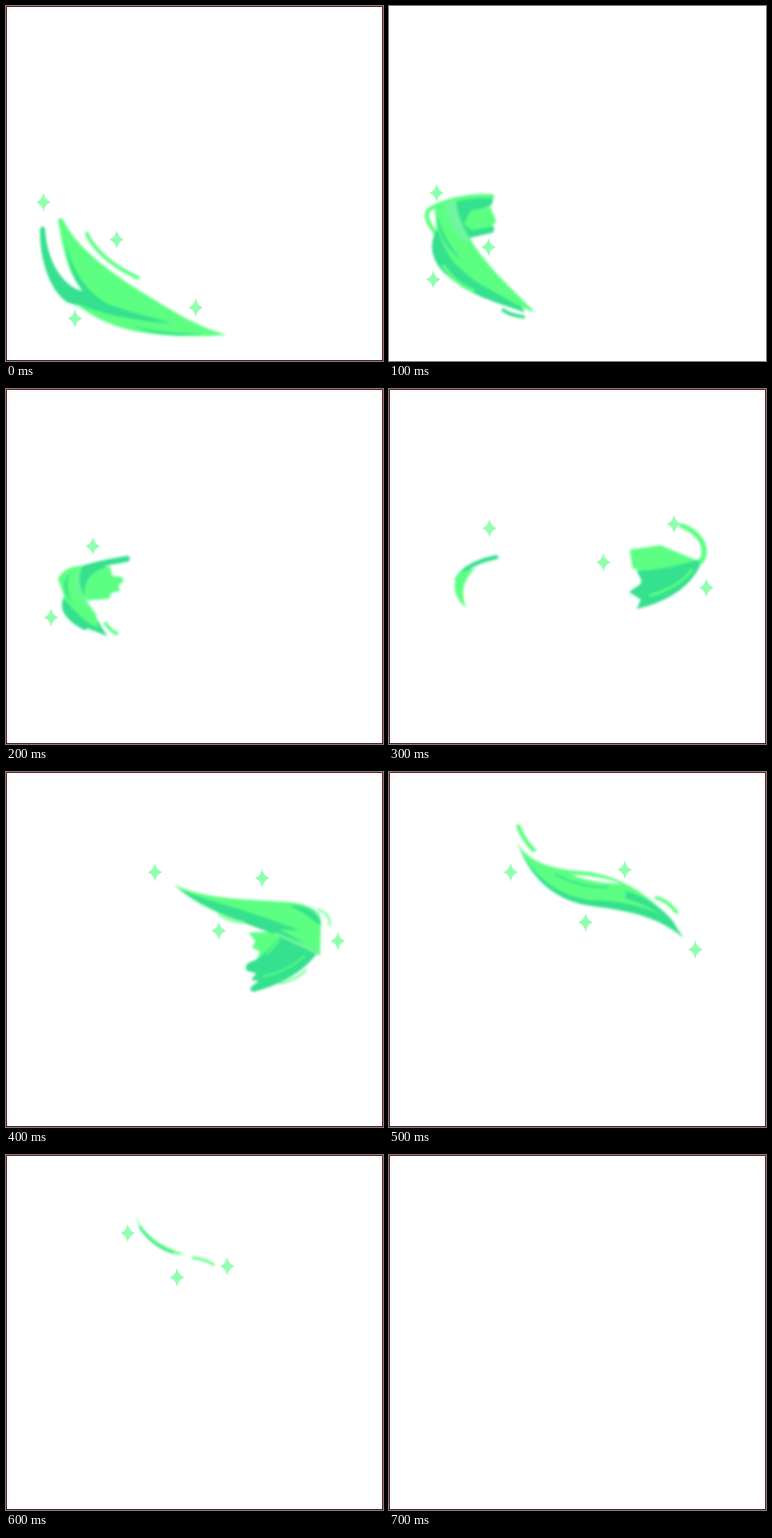
These frames come from a looping animation (443x418 px, 0.8 s). An HTML page:

```html
<!DOCTYPE html>
<html lang="en">
<head>
<meta charset="utf-8">
<title>Green swirl</title>
<style>
html, body { margin: 0; width: 100%; height: 100%; overflow: hidden; background: #fff; }
svg { display: block; width: 443px; height: 418px; }
</style>
</head>
<body>
<svg id="stage" viewBox="0 0 443 418">
  <defs>
    <filter id="soft" filterUnits="userSpaceOnUse" x="0" y="0" width="443" height="418" color-interpolation-filters="sRGB">
      <feGaussianBlur stdDeviation="1.6"/>
    </filter>
    <filter id="faint" filterUnits="userSpaceOnUse" x="0" y="0" width="443" height="418" color-interpolation-filters="sRGB">
      <feGaussianBlur stdDeviation="0.5"/>
    </filter>
  </defs>
</svg>
<script>
const NS = 'http://www.w3.org/2000/svg';
const STEP = 100, LOOP = 800;
const L = '#5cff82', T = '#35e08e', M = '#72f5a0', P = '#8effaa', W = '#fff';
const STAR = 'M0-11Q1.6-2.6 8.5 0Q1.6 2.6 0 11Q-1.6 2.6-8.5 0Q-1.6-2.6 0-11Z';
const stage = document.getElementById('stage');

// Each pose: strokes as [colour, path, line width]; no width means a filled shape.
const poses = [
  { stars: [[44, 231], [130, 275], [223, 355], [81, 368]], shapes: [
    [T, 'M40 262Q43 257 46 262C47 286 56 318 82 333L112 362L72 349C50 334 39 295 40 262Z'],
    [L, 'M61 252Q64 247 68 253C82 283 120 312 160 337C195 359 225 378 259 387C215 391 165 389 130 377C105 368 88 357 75 344L93 338C72 316 68 290 61 252Z'],
    [T, 'M70 276C77 310 92 334 118 350C142 360 170 366 196 374C155 371 112 364 72 346L60 325C72 330 82 333 90 336C78 320 72 300 70 276Z'],
    [T, 'M147 376C174 384 204 386 232 386C204 390 170 387 147 376Z'],
    [L, 'M95 268C103 288 128 308 155 320', 4.5]] },
  { bare: true, stars: [[56, 220], [117, 284], [52, 322]], shapes: [
    [T, 'M54 234C75 224 98 222 123 223L121 234L108 240L124 262L122 267L95 273L58 292Z'],
    [L, 'M96 241L119 236L126 254L120 260L98 264L88 257Z'],
    [L, 'M121 224C92 222 62 230 47 240C40 247 48 259 57 270', 5],
    [T, 'M55 265C46 283 51 302 68 317C95 342 130 350 160 361L146 338L98 286Z'],
    [L, 'M54 240C65 230 72 230 79 230C82 260 104 294 147 336L172 361C148 353 118 332 96 322C74 304 55 276 54 240Z'],
    [M, 'M66 231L79 229C79 246 86 262 97 276L88 277C75 264 68 248 66 231Z'],
    [T, 'M57 246C61 264 72 285 86 300C70 288 57 271 57 246Z'],
    [T, 'M62 288C75 306 100 327 125 341', 3],
    [L, 'M64 306C75 322 88 331 99 335', 4],
    [T, 'M134 358C141 363 150 365 158 366', 4]] },
  { stars: [[102, 185], [53, 269]], shapes: [
    [T, 'M142 200C116 205 94 208 75 218', 7],
    [L, 'M90 222C98 211 112 209 122 209L125 220L138 222L137 228L132 231L134 238L124 240L121 247L96 249L88 240Z'],
    [T, 'M84 216C95 208 107 208 119 209C101 215 93 222 92 242L80 237Z'],
    [T, 'M69 243C60 258 69 272 92 284L96 282L119 291L105 268L80 235Z'],
    [L, 'M61 224C65 214 76 208 91 208C82 221 87 242 106 265L108 281C92 275 80 260 69 248Q66 235 61 224Z'],
    [T, 'M76 216C69 228 72 240 78 252C67 240 65 226 76 216Z'],
    [M, 'M85 216C80 232 88 246 97 257', 3],
    [L, 'M117 276Q122 284 130 288', 4]] },
  { stars: [[118, 164], [335, 159], [252, 204], [373, 234]], shapes: [
    [T, 'M126 198C102 203 87 211 80 224', 5],
    [L, 'M82 216C73 230 77 247 91 258C84 241 86 227 101 211Z'],
    [L, 'M283 189L319 184L367 204L350 226L294 232L300 216L286 211Z'],
    [T, 'M291 214C318 214 344 207 369 199C360 229 331 250 291 259L296 248L282 239L298 228Z'],
    [L, 'M307 243C329 237 346 226 356 213', 3],
    [L, 'M367 203C377 185 363 168 344 161', 6]] },
  { stars: [[175, 118], [301, 125], [250, 187], [390, 199]], shapes: [
    [L, 'M285 189L324 188L354 208L324 222L296 220L298 211L289 207L293 199Z'],
    [T, 'M324 193L366 213C348 237 323 250 291 259Q284 257 289 252L297 246L288 245L294 237L283 234Q278 226 292 222L302 215Z'],
    [L, 'M300 207L314 194M307 214L321 199', 2],
    [L, 'M302 241C320 237 337 229 351 217', 2],
    [L, 'M197 132C228 149 280 150 330 153C357 155 373 164 370 181L369 216C340 202 306 187 274 175C240 164 215 150 197 132Z'],
    [T, 'M203 138C240 153 289 164 346 187L321 185L352 202C310 189 245 169 203 138Z'],
    [T, 'M332 157C352 157 369 164 370 181C358 173 348 163 332 157Z'],
    [M, 'M316 190C338 198 352 207 367 214', 3],
    [P, 'M367 162C377 166 382 173 380 180', 3],
    [P, 'M352 233C345 242 335 246 322 249', 3],
    [P, 'M251 168Q264 176 278 177', 4]] },
  { stars: [[143, 118], [277, 115], [231, 177], [360, 209]], shapes: [
    [L, 'M150 82C162 104 184 112 216 116C261 117 310 139 346 195C320 171 283 164 240 158C193 151 164 119 150 82Z'],
    [T, 'M155 94C172 123 197 145 236 151C276 151 309 160 333 176L346 195C315 170 282 163 240 158C196 153 169 126 155 94Z'],
    [T, 'M278 140C306 149 326 163 338 182C319 165 299 155 278 149Z'],
    [T, 'M196 121Q227 137 258 136', 2],
    [W, 'M214 121C235 121 257 125 273 132C252 131 232 128 214 121Z'],
    [L, 'M152 64Q158 80 170 92', 5],
    [L, 'M314 148Q327 151 338 165', 4]] },
  { stars: [[143, 92], [260, 131], [201, 144]], shapes: [
    [L, 'M151 70C160 91 180 108 211 117C188 119 162 103 151 70Z'],
    [T, 'M157 85Q171 107 196 115', 2],
    [L, 'M220 121Q234 123 244 129', 3]] },
  { stars: [], shapes: [] }
];

function add(parent, tag, attrs) {
  const el = document.createElementNS(NS, tag);
  for (const key in attrs) el.setAttribute(key, attrs[key]);
  parent.appendChild(el);
  return el;
}

function build({ stars, shapes, bare }) {
  const group = add(stage, 'g', { visibility: 'hidden' });
  const brush = add(group, 'g', { filter: 'url(#soft)' });
  for (const [colour, d, width] of shapes) {
    add(brush, 'path', width
      ? { d, fill: 'none', stroke: colour, 'stroke-width': width, 'stroke-linecap': 'round' }
      : { d, fill: colour });
  }
  const glints = add(group, 'g', { filter: 'url(#faint)', fill: '#92ffb0' });
  for (const [x, y] of stars) add(glints, 'path', { d: STAR, transform: `translate(${x} ${y})` });
  if (!bare) {
    add(group, 'path', { d: 'M.5 418V.5H442.5V418', fill: 'none', stroke: '#560000' });
    add(group, 'path', { d: 'M0 417.5H443', stroke: '#380008' });
  }
  return group;
}

const groups = poses.map(build);
let shown = -1;

function draw(now) {
  const next = Math.floor((now % LOOP) / STEP);
  if (next !== shown) {
    groups.forEach((g, i) => g.setAttribute('visibility', i === next ? 'visible' : 'hidden'));
    shown = next;
  }
}

const start = performance.now();
function tick() {
  draw(performance.now() - start);
  requestAnimationFrame(tick);
}
tick();
</script>
</body>
</html>
```
